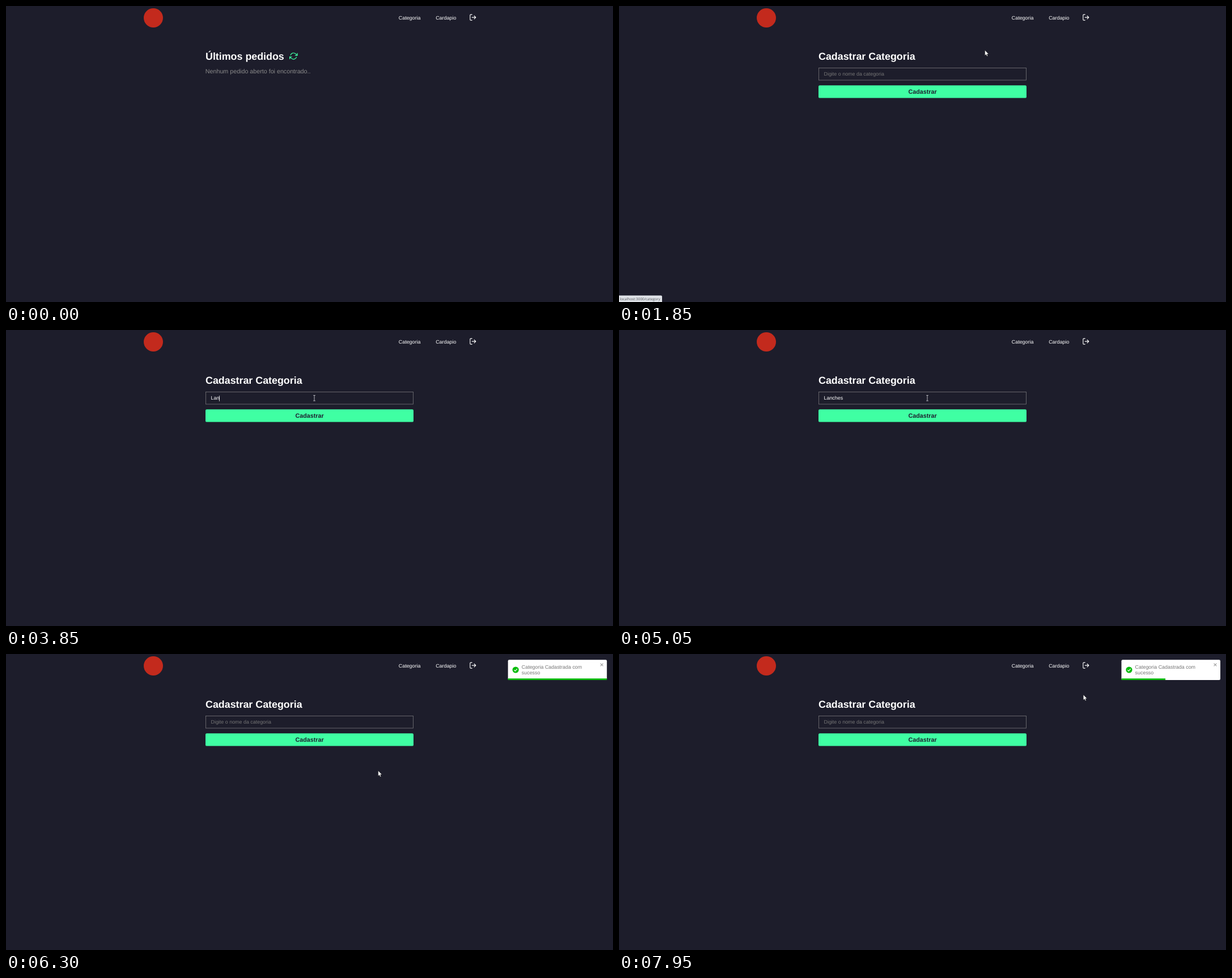
Animation, 1071 px wide and 523 px high, one loop 8000 ms. Source, as an HTML page:

```html
<!DOCTYPE html>
<html lang="pt-BR">
<head>
<meta charset="utf-8">
<title>Cadastrar Categoria</title>
<style>
  html, body { margin: 0; width: 100%; height: 100%; overflow: hidden; background: #1d1d2b; }
  svg { display: block; width: 100%; height: 100%; }
  text { font: 8.925px Arial, "Liberation Sans", sans-serif; fill: #fff; text-rendering: geometricPrecision; white-space: pre; }
  .title { font-size: 17.85px; font-weight: bold; }
  .mid { font-size: 10.71px; }
  .icon { fill: none; stroke-width: 2; stroke-linecap: round; stroke-linejoin: round; }
  .hint, .toast text { fill: #757575; }
  #status text { font: 6.4px "Open Sans", "Noto Sans", sans-serif; fill: #4f5358; }
</style>
</head>
<body>
<svg viewBox="0 0 1071 523" xmlns="http://www.w3.org/2000/svg">
  <rect width="1071" height="523" fill="#1d1d2b"/>

  <circle cx="260" cy="21" r="17" fill="#c32a1d"/>
  <text x="692.8" y="23.9">Categoria</text>
  <text x="758.2" y="23.9">Cardapio</text>
  <g class="icon" stroke="#fff" transform="translate(817.2 13.4) scale(.5578)">
    <path d="M9 21H5a2 2 0 0 1-2-2V5a2 2 0 0 1 2-2h4M16 17l5-5-5-5M21 12H9"/>
  </g>

  <g id="orders">
    <text class="title" x="352" y="95.3">Últimos pedidos</text>
    <g class="icon" stroke="#3fffa3" transform="translate(500 81.2) scale(.61)">
      <path d="M23 4v6h-6M1 20v-6h6M3.51 9a9 9 0 0 1 14.85-3.36L23 10M1 14l4.64 4.36A9 9 0 0 0 20.49 15"/>
    </g>
    <text class="mid" x="351.8" y="118.6" style="fill:#8a8a8a">Nenhum pedido aberto foi encontrado..</text>
  </g>

  <g id="form">
    <text class="title" x="352" y="95.3">Cadastrar Categoria</text>
    <rect x="352.4" y="109.4" width="366.2" height="21.6" fill="none" stroke="#79777b" stroke-width=".8"/>
    <text class="hint" id="hint" x="361.5" y="123.1">Digite o nome da categoria</text>
    <text id="value" x="361.5" y="123.1"></text>
    <rect id="caret" y="116" width="1" height="10" fill="#c8c8cc"/>
    <rect x="352" y="140.2" width="367" height="22.4" rx="2.2" fill="#3fffa3"/>
    <text class="mid" x="535.6" y="154.8" text-anchor="middle" style="font-weight:bold;fill:#1d1d2e">Cadastrar</text>
  </g>

  <g id="status">
    <path d="M0 511.5H74Q76 511.5 76 513.5V523H0Z" fill="#dfe2e7"/>
    <text x="1.6" y="519.7">localhost:3000/category</text>
  </g>

  <g id="toast" class="toast">
    <rect x="886.5" y="10.2" width="174.5" height="35.8" rx="2.2" fill="#fff"/>
    <circle cx="900" cy="28" r="5.6" fill="#07bc0c"/>
    <path d="M897.3 28.2l1.9 1.9 3.6-4" fill="none" stroke="#fff" stroke-width="1.2"/>
    <text x="910.6" y="25.8">Categoria Cadastrada com</text>
    <text x="910.6" y="36.1">sucesso</text>
    <path d="M1049.6 16.6l4.8 4.8m0-4.8l-4.8 4.8" stroke="#9a9a9a" stroke-width="1.1"/>
    <rect id="bar" x="886.5" y="43.2" height="2.8" fill="#07bc0c"/>
  </g>

  <g id="cursor">
    <path id="arrow" d="M0 0V9.3L2.1 7.4 3.5 10.6 5 10 3.6 6.8H6.5Z" fill="#fff" stroke="#111" stroke-width=".4"/>
    <path id="beam" d="M-1.8-4.8H1.8M0-4.8V4.8M-1.8 4.8H1.8" fill="none" stroke="#c4c4ca" stroke-width=".9"/>
    <path id="hand" d="M-1 1Q-1-.3 0-.3T1 1V4.4Q2.2 3.7 2.8 4.8 4 4.2 4.5 5.3 6 5 6 6.5V8.8Q6 10.2 5 11.2V12.5H-.3V11.3L-2.8 7.6Q-3.3 6.4-2.3 6.2T-1 7.2Z" fill="#fff" stroke="#111" stroke-width=".5"/>
  </g>
</svg>
<script>
const LOOP = 8000, STEP = 50;
const $ = id => document.getElementById(id);
const show = (id, on) => { $(id).style.display = on ? "" : "none"; };
const clamp = v => Math.min(1, Math.max(0, v));
const progress = (t, a, b) => clamp((t - a) / (b - a));
const easeOut = power => u => 1 - (1 - u) ** power;
const smooth = u => u * u * (3 - 2 * u);
const linear = u => u;

// Each move bends past "via" and ends at "to"; the next one starts there.
const entry = [14, 227], ENTER = 150;
const moves = [
  { span: [150, 1150], via: [370, 122], to: [726, 18], ease: easeOut(2) },
  { span: [1800, 2300], via: [623, 107], to: [544, 120.3], ease: easeOut(5) },
  { span: [5050, 5450], via: [560, 140], to: [547, 156.7], ease: smooth },
  { span: [6000, 6800], via: [700, 277], to: [982, 132.5], ease: smooth },
  { span: [6850, 7300], via: [1075, 220], to: [950, 185], ease: linear },
  { span: [7300, 7700], via: [875, 110], to: [977, 72], ease: linear },
  { span: [7700, 7950], via: [898, 72], to: [819.3, 72], ease: linear }
];

function pointer(t) {
  let at = entry;
  for (const { span, via, to, ease } of moves) {
    if (t < span[0]) break;
    const s = ease(progress(t, ...span));
    at = at.map((a, i) => (1 - s) ** 2 * a + 2 * s * (1 - s) * via[i] + s * s * to[i]);
  }
  return at;
}

function pointerKind(x, y, form) {
  const over = (l, top, r, b) => x >= l && x <= r && y >= top && y <= b;
  if (over(692, 14, 733, 28)) return "hand";
  if (form && over(352, 109, 719, 131.5)) return "beam";
  if (form && over(352, 140, 719, 163)) return "hand";
  return "arrow";
}

// Typing pauses after the first letter, then slows down steadily.
const word = "Lanches";
const keyTime = i => i ? 3740 + 60 * (i - 1) + 20 * (i - 1) ** 2 : 3500;
const typedAt = t => [...word].filter((c, i) => t >= keyTime(i)).join("");

function caretOn(t) {
  if (t < 2450 || t >= 5700) return false;
  if (t < 3500) return Math.floor((t - 2450) / 400) % 2 === 0;
  return t < 5050 || t >= 5450;
}

// bounce-in from the right: share of the run, offset in px
const bounce = [[0, 1673], [.6, -14], [.75, 5.6], [.9, -2.8], [1, 0]];

function toastOffset(t) {
  const u = progress(t, 5777, 6337);
  if (u === 1) return 0;
  const i = bounce.findIndex(b => b[0] > u);
  const [u0, x0] = bounce[i - 1], [u1, x1] = bounce[i];
  return x0 + (x1 - x0) * easeOut(3)((u - u0) / (u1 - u0));
}

function draw(t) {
  const form = t >= 1650;
  show("orders", !form);
  show("form", form);

  const typed = t < 5750 ? typedAt(t) : "";
  $("value").textContent = typed;
  show("hint", !typed);
  show("caret", caretOn(t));
  const width = typed ? $("value").getComputedTextLength() : 0;
  $("caret").setAttribute("x", Math.round(361 + width));

  $("status").style.opacity = progress(t, 950, 1100) * (1 - progress(t, 1950, 2150));

  show("toast", t >= 6000);
  $("toast").setAttribute("transform", `translate(${toastOffset(t)} 0)`);
  $("toast").style.opacity = .97 + .03 * progress(t, 6000, 6100);
  $("bar").setAttribute("width", 174.5 * (1 - progress(t, 6360, 9223)));

  show("cursor", t >= ENTER);
  const [x, y] = pointer(t), kind = pointerKind(x, y, form);
  for (const k of ["arrow", "beam", "hand"]) show(k, k === kind);
  $("cursor").setAttribute("transform", `translate(${x} ${y})`);
}

const start = performance.now();
function tick() {
  const t = (performance.now() - start) % LOOP;
  draw(Math.floor(t / STEP) * STEP);
  requestAnimationFrame(tick);
}
tick();
</script>
</body>
</html>
```
